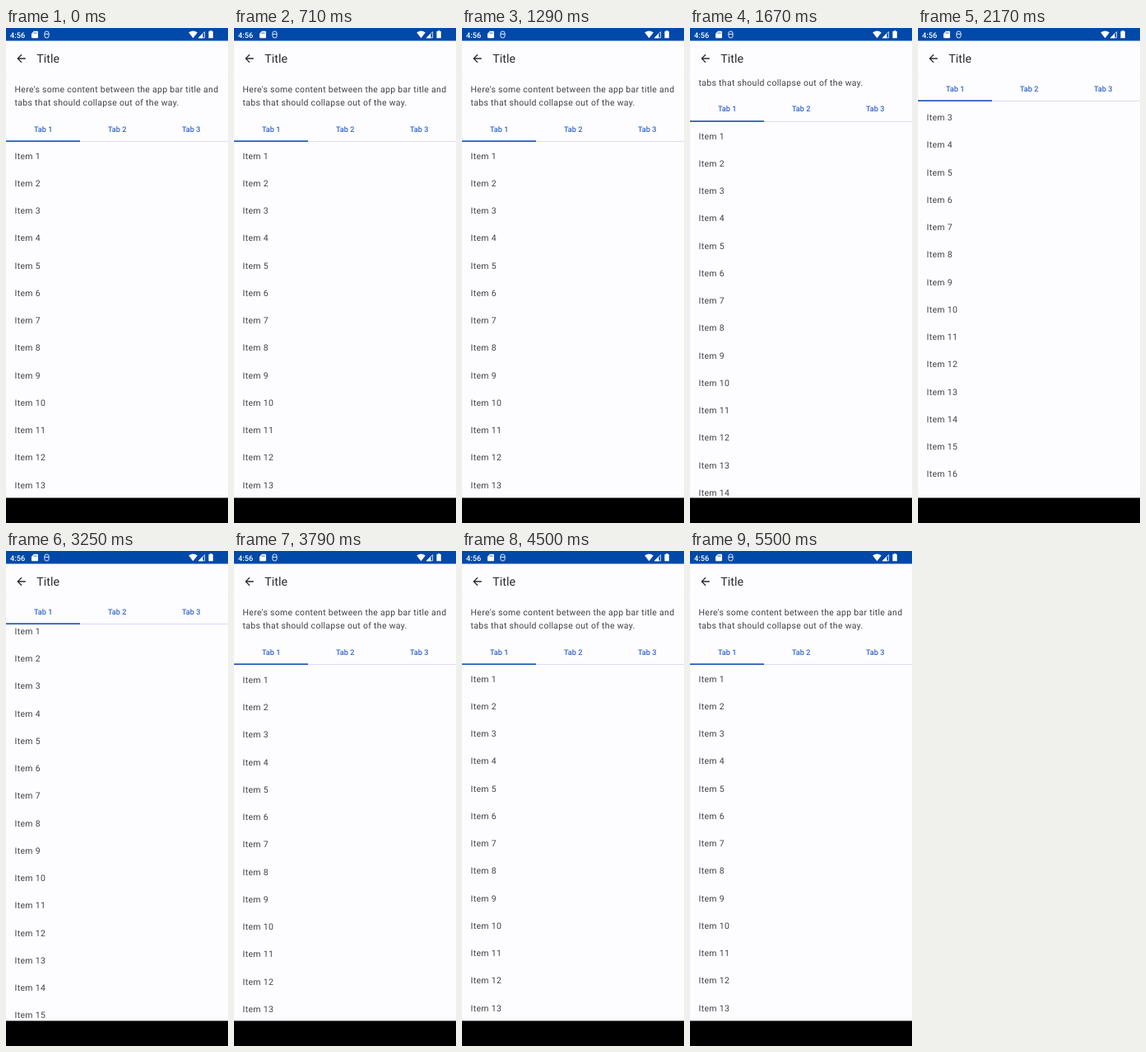
Animation, 270 px wide and 600 px high, one loop 5.54 s. Source, as an HTML page:

```html
<!DOCTYPE html>
<html lang="en">
<head>
<meta charset="utf-8">
<title>Collapsing app bar</title>
<style>
  html, body { margin: 0; width: 100%; height: 100%; overflow: hidden; background: #fdfcff; }
  svg { display: block; width: 270px; height: 600px; text-rendering: geometricPrecision; }
  text { font-family: Roboto, sans-serif; fill: #2a2a2e; }
  .body text { font-size: 10.5px; letter-spacing: .29px; fill: #414147; }
  .tabs text { font-size: 9.2px; font-weight: 500; letter-spacing: .03px; fill: #3266cb; text-anchor: middle; }
  .surface { fill: #fdfcff; }
</style>
</head>
<body>
<svg viewBox="0 0 270 600">
  <rect class="surface" width="270" height="600"/>
  <g id="list" class="body"></g>

  <g id="header">
    <rect class="surface" y="57" width="270" height="81"/>
    <g class="body">
      <text x="10.6" y="78.2">Here's some content between the app bar title and</text>
      <text x="10.6" y="94">tabs that should collapse out of the way.</text>
    </g>
    <g class="tabs">
      <text x="45.2" y="125.6">Tab 1</text>
      <text x="135.2" y="125.6">Tab 2</text>
      <text x="225.2" y="125.6">Tab 3</text>
    </g>
    <rect y="137" width="270" height="1" fill="#dcdaf2"/>
    <rect y="136.4" width="90" height="1.6" fill="#1750b4"/>
  </g>

  <rect class="surface" y="15" width="270" height="42.5"/>
  <path transform="translate(10.7 29.1) scale(.656)" fill="#2a2a2e"
    d="M20 11H7.83l5.59-5.59L12 4l-8 8 8 8 1.41-1.41L7.83 13H20z"/>
  <text x="37.3" y="41.8" font-size="14.3">Title</text>

  <!-- status bar -->
  <rect width="270" height="15.5" fill="#0049a9"/>
  <text x="5" y="11.5" font-size="9.2" font-weight="500" style="fill:#fff">4:56</text>
  <g fill="#fff">
    <path d="M34 3.8h4q1 0 1 1v6.4q0 1-1 1h-6q-1 0-1-1V6.8z"/>
    <path d="M34 5.3v1.7M35.6 5.3v1.7M37.2 5.3v1.7" stroke="#0049a9" stroke-width=".7"/>
    <path d="M46.9 7.4V6.3a2.6 2.3 0 0 1 5.2 0v3.4a2.6 2.3 0 0 1-5.2 0zh5.2"
      fill="none" stroke="#fff" stroke-width=".9"/>
    <path d="M222.2 5.6q5.3-4.2 10.6 0l-5.3 6.6z"/>
    <path d="M241.6 4.6v7.2h-7.2z" fill="none" stroke="#fff" stroke-width=".8"/>
    <path d="M239.4 6.6v5.6h-5.6z"/>
    <path d="M247.9 3h2.4v1h1.5v8.2h-5.4V4h1.5z"/>
  </g>

  <rect y="569.5" width="270" height="30.5" fill="#000"/>
</svg>
<script>
  const LOOP = 5540, COLLAPSE = 49, ROW = 33.25;
  const list = document.getElementById('list');
  const header = document.getElementById('header');

  for (let i = 0; i < 20; i++) {
    list.insertAdjacentHTML('beforeend',
      `<text x="10.6" y="${158.7 + i * ROW}">Item ${i + 1}</text>`);
  }

  // Drag path: [time in ms, scrolled pixels], ending in a slight overscroll
  const path = [[0, 0], [1400, 0], [1670, 24], [2170, 113], [2450, 135], [2800, 128],
    [3250, 58], [3650, -2], [3790, -1.1], [4000, 0], [LOOP, 0]];

  const rate = (a, b) => (b[1] - a[1]) / (b[0] - a[0]);

  // Slope through a point, flat at turning points and ends
  function slope(i) {
    const a = path[i - 1], p = path[i], b = path[i + 1];
    return a && b && rate(a, p) * rate(p, b) > 0 ? rate(a, b) : 0;
  }

  function scrollAt(t) {
    const i = path.findIndex(p => p[0] > t) - 1;
    const [t0, y0] = path[i], [t1, y1] = path[i + 1];
    const d = t1 - t0, u = (t - t0) / d, v = 1 - u;
    return v * v * ((1 + 2 * u) * y0 + u * d * slope(i))
      + u * u * ((3 - 2 * u) * y1 - v * d * slope(i + 1));
  }

  const shift = (el, y) => el.setAttribute('transform', `translate(0 ${-y})`);

  function draw() {
    const y = scrollAt(performance.now() % LOOP);
    shift(list, y);
    shift(header, Math.min(Math.max(y, 0), COLLAPSE));
    requestAnimationFrame(draw);
  }
  draw();
</script>
</body>
</html>
```
